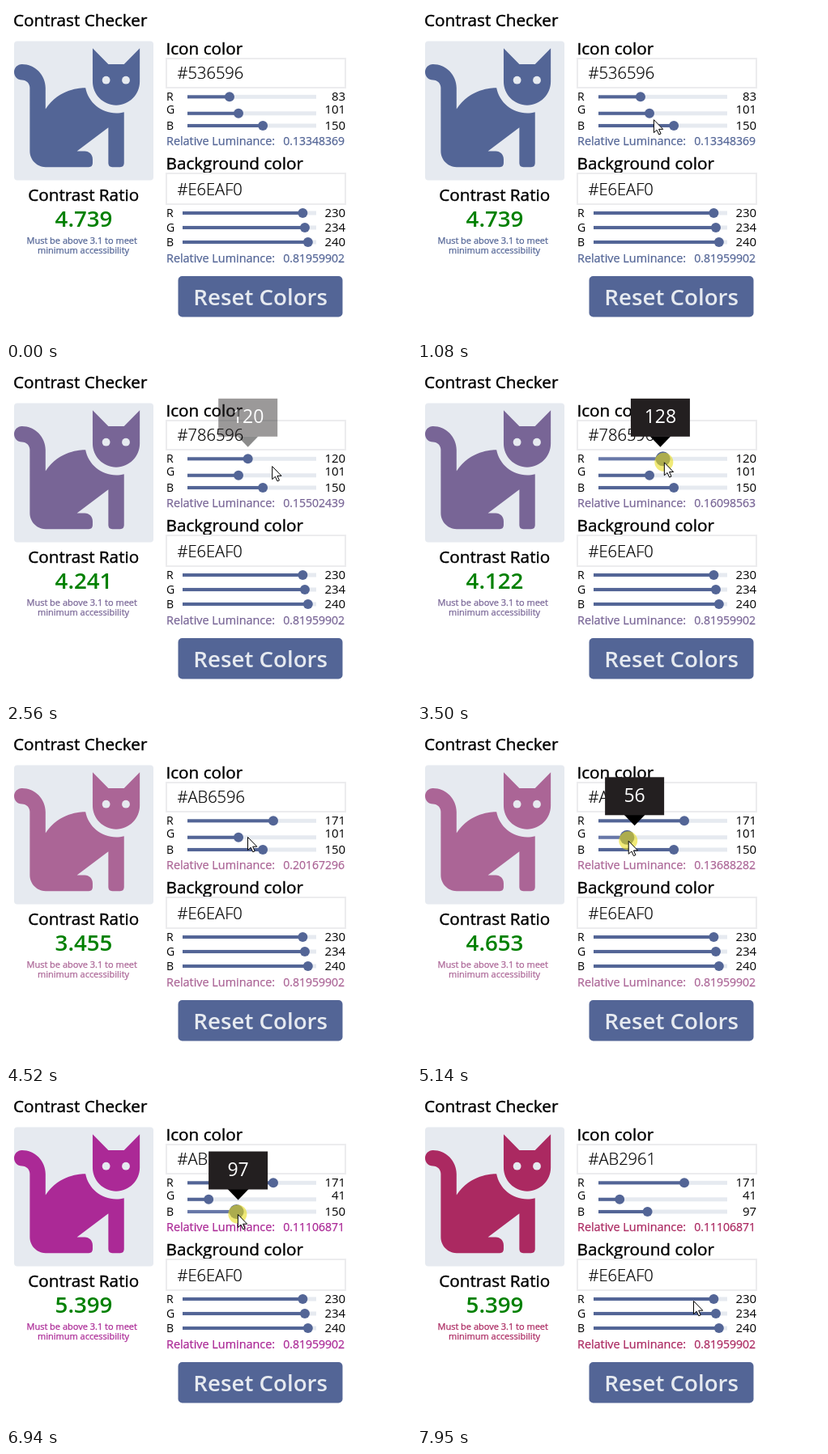
Recreate the animation shown at these times as an HTML page. Size 500 by 413 pixels, loop 8000 ms.

```html
<!DOCTYPE html>
<html lang="en">
<head>
<meta charset="utf-8">
<title>Contrast Checker</title>
<style>
html, body { margin: 0; width: 100%; height: 100%; overflow: hidden; background: #fff; }
svg { display: block; width: 100vw; height: 100vh; font-family: "Open Sans", "Noto Sans", sans-serif; }
.head { font-size: 20.7px; stroke: #000; stroke-width: .4; }
.hex { font-size: 20.1px; font-weight: 300; stroke: #000; stroke-width: .2; }
.tint { fill: var(--tint); }
.lum, .note { stroke: var(--tint); stroke-width: .25; }
.lum { font-size: 14.4px; }
.lum.val { font-size: 14px; }
.note { font-size: 11px; text-anchor: middle; }
.key { font-size: 14px; }
.num { font-size: 15px; text-anchor: end; }
.big { font-size: 27.7px; font-weight: 600; text-anchor: middle; }
.tip { font-size: 23px; fill: #fff; text-anchor: middle; }
.box { fill: #fff; stroke: #ececee; stroke-width: 2; }
</style>
</head>
<body>
<svg id="stage" viewBox="0 0 500 413">
  <text class="head" x="9" y="25">Contrast Checker</text>
  <rect x="10" y="43.5" width="172" height="172" rx="4" fill="#E6EAF0"/>
  <path class="tint" transform="translate(10 42.5) scale(.303 .306)" d="M291 192c-20 0-107 2-163 86V192c0-53-43-96-96-96-18 0-32 14-32 32s14 32 32 32 32 14 32 32v256c0 35 29 64 64 64h176q16 0 16-16v-16c0-18-14-32-32-32h-32l128-96v144q0 16 16 16h32q16 0 16-16V290c-10 3-21 4-32 4-62 0-114-44-125-102zM448 96h-64l-64-64v134c0 53 43 96 96 96s96-43 96-96V32z"/>
  <g fill="#E6EAF0"><circle cx="123.6" cy="91.7" r="4.9"/><circle cx="148" cy="91.7" r="4.9"/></g>
  <text class="head" x="95.7" y="241" text-anchor="middle">Contrast Ratio</text>
  <text class="big" id="ratio" x="96" y="273" fill="#008000"></text>
  <text class="note tint" x="93.7" y="294">Must be above 3.1 to meet</text>
  <text class="note tint" x="95.5" y="306">minimum accessibility</text>

  <text class="head" x="197.5" y="60">Icon color</text>
  <text class="head" x="197.5" y="202">Background color</text>
  <rect class="box" x="198" y="65" width="221" height="36"/>
  <rect class="box" x="198" y="207" width="221" height="38"/>
  <text class="hex" id="hex" x="211.5" y="90"></text>
  <text class="hex" id="hexBack" x="211.5" y="234"></text>
  <g id="sliders"></g>
  <text class="lum tint" x="198" y="172">Relative Luminance:</text>
  <text class="lum val tint" id="lum" x="342.3" y="172"></text>
  <text class="lum tint" x="198" y="317">Relative Luminance:</text>
  <text class="lum val tint" id="lumBack" x="342.3" y="317"></text>

  <rect x="212.5" y="334" width="203" height="50.5" rx="5" fill="#536596"/>
  <text class="big" x="314.2" y="370" fill="#E6EAF0">Reset Colors</text>

  <g id="tip">
    <path d="M-13-28H13L0-14.5z"/>
    <rect x="-36.5" y="-74.5" width="73" height="47" fill="#231f20"/>
    <text class="tip" id="tipText" y="-44"></text>
  </g>
  <g id="pointer">
    <circle id="glow" r="11.5" fill="#e8dc1e" opacity=".6"/>
    <path id="arrow" d="M.5.5V16.5L4.2 13.2 6.8 18.8 9.2 17.8 6.7 12.2H11.8z" fill="#fff" stroke="#000"/>
    <path id="beam" d="M-4-8.5H-1L0-7.5 1-8.5H4M0-7.5V7.5M-4 8.5H-1L0 7.5 1 8.5H4" fill="none" stroke="#222" stroke-width="1.5"/>
  </g>
</svg>
<script>
const LOOP = 8000, START = 530, STEP = 78.1, FADE = 310;
const $ = id => document.getElementById(id);
const ICON = [83, 101, 150], BACK = [230, 234, 240];

// Pointer arrives, drags one channel, lets go, then wanders to a spot
const drags = [
  { ch: 0, to: 120, reach: 1235, start: 1560, stop: 2190, drop: 2330, dy: -8, then: [2640, 333, 124] },
  { ch: 0, to: 171, reach: 3190, start: 3320, stop: 4055, drop: 4200, dy: 4, then: [4518, 298, 132] },
  { ch: 1, to: 41, reach: 4750, start: 4840, stop: 5290, drop: 5450, dy: 4, then: [5845, 266, 164] },
  { ch: 2, to: 97, reach: 6230, start: 6480, stop: 6930, drop: 7090, dy: 3, then: [7870, 316, 257] }
];

const iconX = v => 225 + 0.614 * v;
const backX = v => 218 + 0.645 * v;
const linear = v => (v /= 255) <= 0.03928 ? v / 12.92 : ((v + 0.055) / 1.055) ** 2.4;
const luminance = ([r, g, b]) => 0.2126 * linear(r) + 0.7152 * linear(g) + 0.0722 * linear(b);
const toHex = rgb => '#' + rgb.map(v => v.toString(16).padStart(2, '0')).join('').toUpperCase();

function ease(t, from, to) {
  const u = Math.min(1, Math.max(0, (t - from) / (to - from)));
  return u * u * (3 - 2 * u);
}

const level = (ch, t) => drags.filter(d => d.ch === ch)
  .reduce((v, d) => v + (d.to - v) * ease(t, d.start, d.stop), ICON[ch]);
const colorsAt = t => ICON.map((_, ch) => Math.round(level(ch, t)));

function addSlider(name, left, y, base = y + 5) {
  const g = document.createElementNS('http://www.w3.org/2000/svg', 'g');
  g.innerHTML = `<text class="key" x="198" y="${base}">${name}</text>
    <text class="num" x="419.2" y="${base}"></text>
    <rect x="${left}" y="${y - 2.5}" width="${383 - left}" height="5" fill="#E6EAF0"/>
    <rect x="${left}" y="${y - 2}" height="4"/>
    <circle cy="${y}" r="6" fill="#536596"/>`;
  $('sliders').append(g);
  const [, num, , bar, knob] = g.children;
  return {
    y,
    set(x, label, held) {
      num.textContent = label;
      bar.setAttribute('width', x - left);
      bar.setAttribute('fill', held ? '#6878a8' : '#536596');
      knob.setAttribute('cx', x);
      knob.setAttribute('r', held ? 9 : 6);
    }
  };
}

const sliders = [addSlider('R', 224, 112.3), addSlider('G', 224, 132.8, 133.3), addSlider('B', 224, 148, 153.3)];
BACK.forEach((v, i) => addSlider('RGB'[i], 218, 256 + 18 * i).set(backX(v), v, false));
const backLum = luminance(BACK);
$('lumBack').textContent = backLum.toFixed(8);
$('hexBack').textContent = toHex(BACK);

const route = [[START, 398, 400]];
for (const d of drags) {
  const x0 = iconX(level(d.ch, d.start)) + 1.3, x1 = iconX(d.to) + 1.3, y = sliders[d.ch].y + d.dy;
  route.push([d.reach, x0, y], [d.start, x0, y], [d.stop, x1, y], [d.drop, x1, y], d.then);
}
route.push([7950, 341, 258]);

function pointerAt(t) {
  const i = route.findIndex(p => p[0] > t);
  if (i < 1) return route.at(i).slice(1);
  const a = route[i - 1], b = route[i], k = ease(t, a[0], b[0]);
  return [a[1] + (b[1] - a[1]) * k, a[2] + (b[2] - a[2]) * k];
}

const show = (el, on) => el.setAttribute('visibility', on ? 'visible' : 'hidden');
const move = (el, x, y) => el.setAttribute('transform', `translate(${x.toFixed(2)} ${y.toFixed(2)})`);

function draw(time) {
  // The screen refreshes at a fixed, low rate
  const n = Math.floor((time - START + 8) / STEP);
  const t = n < 0 ? 0 : START + 5 + n * STEP;

  const live = colorsAt(t);
  const saved = colorsAt(Math.max(0, ...drags.map(d => d.drop).filter(v => v <= t)));
  const held = drags.find(d => t >= d.start - 100 && t < d.drop);
  const open = drags.find(d => t >= d.reach && t < d.drop + FADE);

  sliders.forEach((s, i) => s.set(iconX(live[i]), saved[i], !!held && held.ch === i));
  const lum = luminance(live), color = toHex(saved);
  $('lum').textContent = lum.toFixed(8);
  $('ratio').textContent = ((backLum + 0.05) / (lum + 0.05)).toFixed(3);
  $('hex').textContent = color;
  $('stage').style.setProperty('--tint', color);

  show($('tip'), open);
  if (open) {
    // The bubble trails the knob by one refresh
    move($('tip'), iconX(level(open.ch, t - STEP)), sliders[open.ch].y);
    $('tipText').textContent = live[open.ch];
    $('tip').setAttribute('opacity', t > open.drop + FADE - 85 ? 0.45 : 1);
  }

  const [x, y] = pointerAt(t);
  const text = x > 198 && x < 335 && y > 158 && y < 176;
  move($('pointer'), x, y);
  show($('arrow'), n >= 0 && !text);
  show($('beam'), n >= 0 && text);
  show($('glow'), held);
}

const begin = performance.now();
function tick() {
  draw((performance.now() - begin) % LOOP);
  requestAnimationFrame(tick);
}
tick();
</script>
</body>
</html>
```
